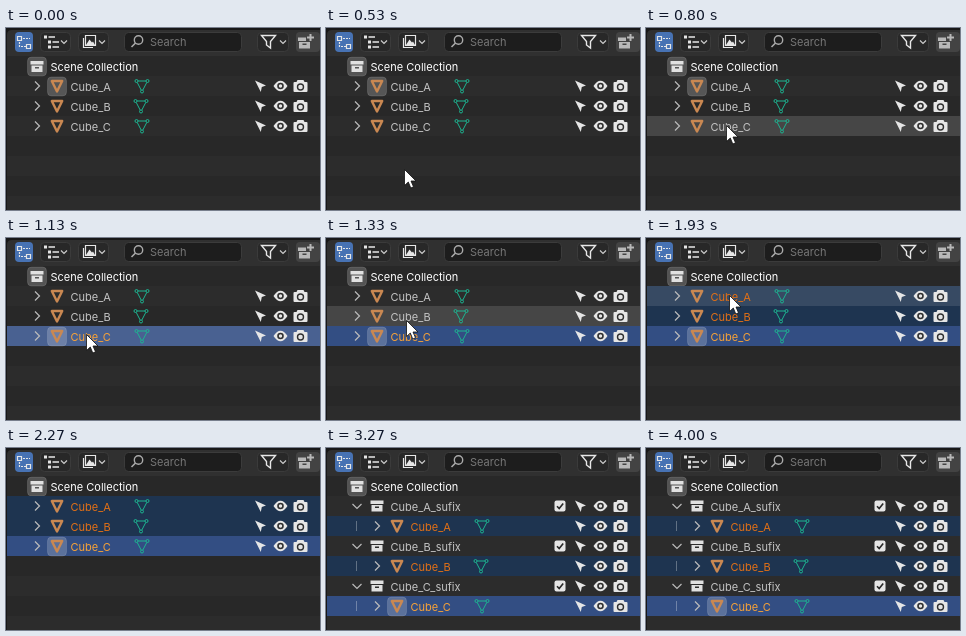
An HTML page for the animation above (5400 ms loop, 314 by 182 pixels).

```html
<!DOCTYPE html>
<html lang="en">
<head>
<meta charset="utf-8">
<title>Outliner</title>
<style>
html, body { margin: 0; width: 100%; height: 100%; overflow: hidden; background: #181818; }
svg { display: block; width: 314px; height: 182px; }
text { font: 11px Inter, sans-serif; }
</style>
</head>
<body>
<svg viewBox="0 0 314 182">
  <defs>
    <g id="select"><path d="M-5-5.5L6-.6 1.8 1 .8 6Z" fill="#e6e6e6"/></g>
    <g id="eye"><path d="M-7 0Q0-10.5 7 0Q0 10.5-7 0Z" fill="#e6e6e6"/><circle r="2.5" fill="#e6e6e6" stroke="#303030" stroke-width="1.6"/></g>
    <g id="camera"><path d="M-6-4H-4L-3-6H3L4-4H6Q7-4 7-3V5Q7 6 6 6H-6Q-7 6-7 5V-3Q-7-4-6-4Z" fill="#e6e6e6"/><circle cy="1" r="3" fill="#e6e6e6" stroke="#303030" stroke-width="1.4"/></g>
    <g id="check"><rect x="-5.5" y="-5.5" width="11" height="11" rx="2" fill="#e6e6e6"/><path d="M-3 .2L-.8 2.5 3.2-2.6" fill="none" stroke="#282828" stroke-width="1.6"/></g>
    <g id="box"><path d="M-6.5-5.5H6.5V-2H-6.5ZM-5.5-1H5.5V5.5H-5.5ZM-2 .5V2H2V.5Z" fill="#e0e0e0" fill-rule="evenodd"/></g>
    <g id="object"><path d="M-5.2-5H5.2L0 5.5Z" fill="none" stroke="#c98852" stroke-width="2.4" stroke-linejoin="round"/></g>
    <g id="mesh" fill="none" stroke="#1db592"><path d="M-4-5H4M-4.8-3.6L-.8 4.1M4.8-3.6L.8 4.1"/><circle cx="-5.5" cy="-5" r="1.5"/><circle cx="5.5" cy="-5" r="1.5"/><circle cy="5.5" r="1.5"/></g>
    <g id="active"><rect x="-9.5" y="-9.5" width="19" height="19" rx="4" fill="#fff" fill-opacity=".2" stroke="#fff" stroke-opacity=".12"/></g>
    <g id="right"><path d="M-2-4.5L2.5 0-2 4.5" fill="none" stroke="#bbb" stroke-width="1.2"/></g>
    <g id="down"><path d="M-4.5-2L0 2.5 4.5-2" fill="none" stroke="#bbb" stroke-width="1.2"/></g>
    <g id="drop"><path d="M-3-1.5L0 1.5 3-1.5" fill="none" stroke="#ccc" stroke-width="1.2"/></g>
    <g id="pointer"><path d="M.5 .5V16.5L4.3 13 6.8 19 9.5 17.8 7 12H12Z" fill="#fff" stroke="#111" stroke-width=".8"/></g>
  </defs>
  <path d="M1 182V7Q1 2 6 2H314V182Z" fill="#303030"/>
  <rect x="1" y="28" width="313" height="154" fill="#282828"/>
  <g id="stripes"></g>
  <g fill="#282828" stroke="#3b3b3b">
    <rect x="34.5" y="4.5" width="30" height="19" rx="4"/>
    <rect x="72.5" y="4.5" width="30" height="19" rx="4"/>
    <rect x="251.5" y="4.5" width="31" height="19" rx="4"/>
    <rect x="118.5" y="4.5" width="117" height="19" rx="4" fill="#1d1d1d"/>
  </g>
  <rect x="9" y="4" width="18" height="20" rx="4" fill="#4772b3"/>
  <g fill="none" stroke="#e6e6e6" stroke-width="1.2">
    <path d="M11.5 8.5H15.5V12.5H11.5ZM20.5 16.5H24.5V20.5H20.5Z"/>
    <path d="M13.5 14V18.5H20M17 10.5H24" stroke-dasharray="2 1"/>
    <path d="M38 9H41M42 14H45M42 19H45" stroke-width="3"/>
    <path d="M42.5 9H49M46.5 14H53M46.5 19H53" stroke-width="1.6"/>
    <path d="M77.5 10V19.5H87M79.5 7.5H89.5V17.5H79.5Z"/>
    <path d="M80 17L83.5 11.5 86 14.5 87 13.5 89 17Z" fill="#e6e6e6" stroke="none"/>
    <circle cx="132.5" cy="12" r="4.2" stroke="#aaa" stroke-width="1.4"/><path d="M129.5 15L125.5 19" stroke="#aaa" stroke-width="1.6"/>
    <path d="M255.5 7.5H269.5L264.5 13.5V20L260.5 17V13.5Z" stroke-width="1.4"/>
  </g>
  <use href="#drop" x="58" y="14"/><use href="#drop" x="96" y="14"/><use href="#drop" x="277" y="14"/>
  <text x="144" y="18" fill="#777">Search</text>
  <rect x="290" y="4" width="24" height="20" rx="4" fill="#434343"/>
  <path d="M292 9.5H300V13H292ZM293 14H304V20.5H293ZM296.5 15.5V17H300.5V15.5ZM303.5 6H305.5V8.5H308V10.5H305.5V13H303.5V10.5H301V8.5H303.5Z" fill="#b8b8b8" fill-rule="evenodd"/>
  <use href="#active" x="31" y="38.5"/><use href="#box" x="31" y="38.5"/>
  <text x="44.5" y="43" fill="#fff">Scene Collection</text>
  <g id="rows"></g>
  <use id="cursor" href="#pointer"/>
</svg>
<script>
const LOOP = 5400, STEP = 200 / 3;
const CLICK = 1065, EXTEND = 1925, GROUP = 3265;
const TOP = 58, ROW = 20;
const names = ["Cube_A", "Cube_B", "Cube_C"];
// time, x, y of the pointer tip
const path = [[400, 78, 170], [533, 78, 141], [667, 79, 112], [800, 80, 97], [1133, 80, 96],
  [1333, 80, 82], [1467, 81, 70], [1600, 82, 61], [1667, 83, 57], [2067, 83, 57],
  [2133, 83, 86], [2200, 84, 132]];
const byId = id => document.getElementById(id);
const rows = byId("rows"), cursor = byId("cursor");

const use = (id, x, y) => `<use href="#${id}" x="${x}" y="${y}"/>`;
const label = (s, x, y, fill) => `<text x="${x - 0.5}" y="${y + 5}" fill="${fill}">${s}</text>`;
const bar = (y, fill) => `<rect x="1" y="${y - ROW / 2}" width="313" height="${ROW}" fill="${fill}"/>`;
const toggles = y => use("select", 254, y) + use("eye", 274.5, y) + use("camera", 294.5, y);

byId("stripes").innerHTML = [0, 2, 4, 6].map(i => bar(TOP + i * ROW, "#2c2c2c")).join("");

function pointerAt(t) {
  t = Math.floor((t + 4) / STEP) * STEP;
  const i = path.findIndex(p => p[0] >= t - 1);
  if (i < 0 || t < 399) return null;
  const b = path[i], a = path[i - 1] || b;
  const k = b === a ? 1 : Math.min(1, (t - a[0]) / (b[0] - a[0]));
  return [1, 2].map(n => Math.round(a[n] + (b[n] - a[n]) * k));
}

function objectRow(i, t, x, y, hover) {
  const active = i === (t < CLICK ? 0 : 2);
  const chosen = t >= (i === 2 ? CLICK : EXTEND);
  const back = chosen ? (active ? "#334e83" : "#1e3450") : "";
  const color = chosen ? (active ? "#f8a238" : "#e27016") : "#c4c4c4";
  return (back && bar(y, back)) +
    (hover ? bar(y, chosen ? "#ffffff1c" : "#464646") : "") +
    use("right", x, y) + (active ? use("active", x + 20, y + 0.5) : "") +
    use("object", x + 20, y) + label(names[i], x + 34, y, color) +
    use("mesh", x + (i === 1 ? 104 : 105), y) + toggles(y);
}

function groupRows(i, t) {
  const y = TOP + i * 2 * ROW;
  return use("down", 31, y) + use("box", 51, y) + label(names[i] + "_sufix", 65, y, "#c4c4c4") +
    use("check", 234, y) + toggles(y) + objectRow(i, t, 51, y + ROW, false) +
    `<path d="M30.5 ${y + 15}V${y + 25}" stroke="#fff" stroke-opacity=".3"/>`;
}

let shown = "";
function draw(t) {
  const p = pointerAt(t);
  const hovered = p ? Math.floor((p[1] - TOP) / ROW + 0.5) : -1;
  const html = names.map((_, i) => t < GROUP
    ? objectRow(i, t, 31, TOP + i * ROW, i === hovered)
    : groupRows(i, t)).join("");
  if (html !== shown) rows.innerHTML = shown = html;
  cursor.style.display = p ? "" : "none";
  if (p) cursor.setAttribute("transform", `translate(${p})`);
}

const start = performance.now();
function tick() {
  draw((performance.now() - start) % LOOP);
  requestAnimationFrame(tick);
}
tick();
</script>
</body>
</html>
```
